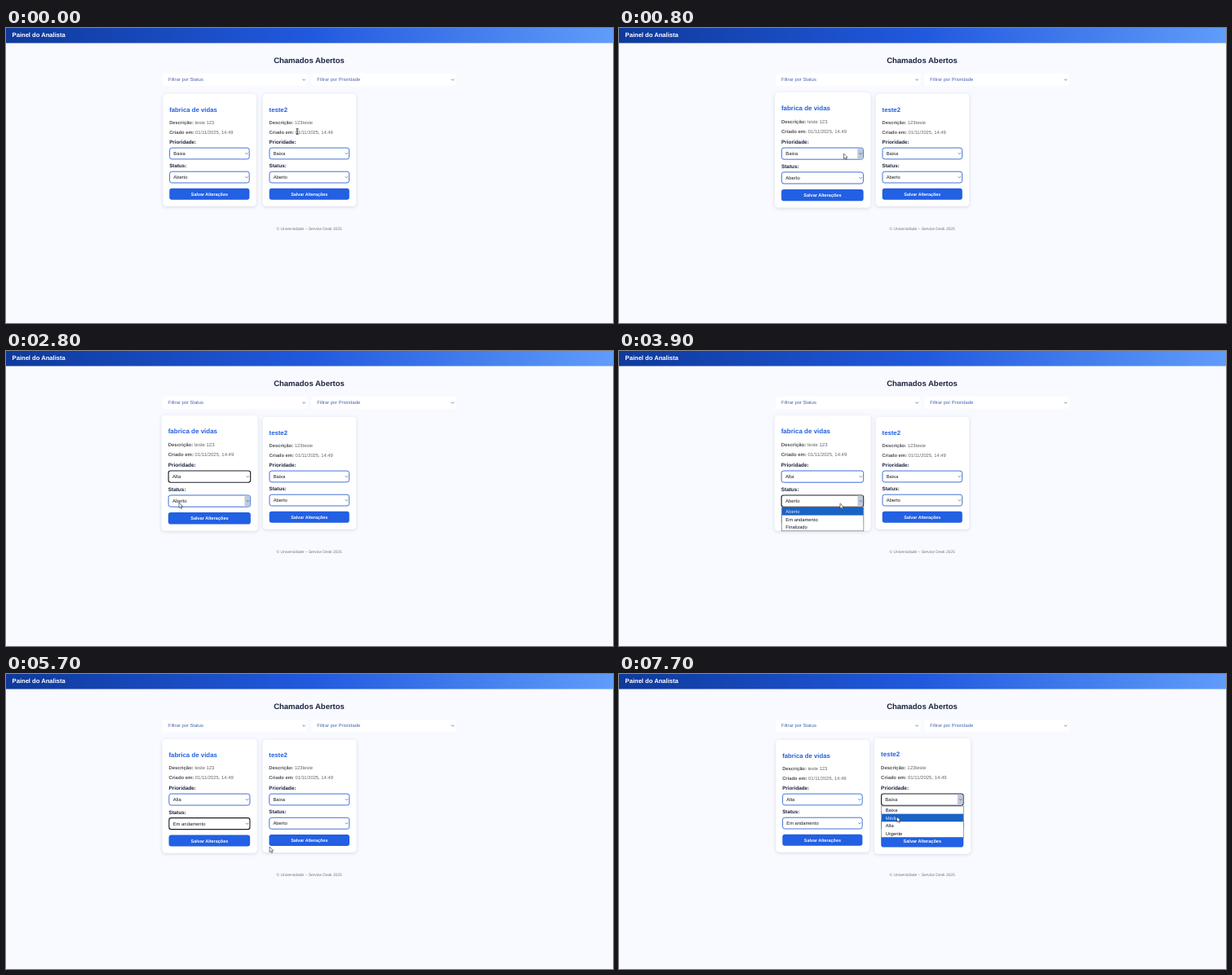
These frames come from a looping animation (744 px wide and 362 px high, 8 s). An HTML page:

```html
<!DOCTYPE html>
<html lang="pt-BR">
<head>
<meta charset="utf-8">
<title>Painel do Analista</title>
<style>
  html, body { margin: 0; width: 100%; height: 100%; overflow: hidden; background: #f8faff; }
  svg { display: block; width: 744px; height: 362px; font: 5.8px "Liberation Sans", Arial, sans-serif; text-rendering: geometricPrecision; }
  .bold { font-weight: 700; }
  .panel { fill: #fff; filter: drop-shadow(0 1.5px 2px rgba(30, 50, 100, .16)); }
  .name { font-size: 7.75px; font-weight: 700; fill: #2160df; }
  .label { font-size: 6.25px; font-weight: 700; fill: #1c2340; }
  .info { fill: #66666c; }
  .info .bold { fill: #505058; }
  .box { fill: #fff; stroke: #3a6cd4; stroke-width: .95; }
  .focus .box { stroke: #1c202a; stroke-width: 1.1; }
  .value { fill: #1c1e26; }
  .block { fill: #bfc9db; visibility: hidden; }
  .hover .block { visibility: visible; }
  .chevron { fill: none; stroke: #4a5878; stroke-width: .75; }
  .button { fill: #2260e4; }
  .action { font-size: 5.4px; font-weight: 700; fill: #fff; text-anchor: middle; }
  .field { fill: #fff; }
  .filter { fill: #4464b8; }
  .list { fill: #fff; stroke: #70747c; stroke-width: .7; }
  .mark { fill: #1b62c6; }
</style>
</head>
<body>
<svg id="stage" viewBox="0 0 744 362"></svg>
<script>
const LOOP = 8000, STEP = 100, ROW = 9.6;
const CENTER = { x: 249.5, y: 150 }, CARD_GAP = 122.4;
const BOX = { x: 200.6, y: 147.1, w: 97.6, h: 13.8 }, FIELD_GAP = 29.1;
const ZOOM = .03, ZOOM_TIME = 400;

const cards = [
  { name: 'fabrica de vidas', description: 'teste 123', enter: 500, leave: 5500 },
  { name: 'teste2', description: '123teste', enter: 5600, leave: LOOP }
];
const fields = [
  { label: 'Prioridade', options: ['Baixa', 'Média', 'Alta', 'Urgente'] },
  { label: 'Status', options: ['Aberto', 'Em andamento', 'Finalizado'] }
];
const picks = [
  { card: 0, field: 0, open: 1000, close: 2800, option: 2 },
  { card: 0, field: 1, open: 3900, close: 5100, option: 1 },
  { card: 1, field: 0, open: 7100, close: LOOP, option: 1 }
];
const start = { x: 357, y: 127 };
const moves = [
  { from: 0, until: 800, x: 275.5, y: 154 },
  { from: 1400, until: 1900, x: 212, y: 186 },
  { from: 3000, until: 3300, x: 271, y: 187 },
  { from: 4300, until: 4500, x: 250, y: 203 },
  { from: 5100, until: 5700, x: 323, y: 212 },
  { from: 5700, until: 6400, x: 359, y: 167 },
  { from: 6800, until: 7000, x: 360, y: 154 },
  { from: 7500, until: 7700, x: 340.5, y: 175 }
];

const stage = document.getElementById('stage');
const $ = id => document.getElementById(id);
const text = (x, y, cls, str) => `<text x="${x}" y="${y}" class="${cls}">${str}</text>`;
const rect = (x, y, w, h, r, cls) => `<rect x="${x}" y="${y}" width="${w}" height="${h}" rx="${r}" class="${cls}"/>`;
const chevron = (x, y) => `<path class="chevron" d="M${x - 1.6} ${y - .8}l1.6 1.6 1.6-1.6"/>`;

const info = (y, label, value) =>
  `<text x="200.2" y="${y}" class="info"><tspan class="bold">${label}:</tspan> ${value}</text>`;

function fieldMarkup({ label }, f, n) {
  const y = BOX.y + f * FIELD_GAP;
  return text(200.2, y - 4.8, 'label', label + ':') + `<g id="select${n}${f}">
    ${rect(BOX.x, y, BOX.w, BOX.h, 2.6, 'box')}
    ${rect(291.2, y + .6, 6.5, BOX.h - 1.2, 1, 'block')}
    ${text(205.3, y + 8.9, 'value', '')}
    ${chevron(295, y + 6.9)}
  </g>`;
}

const cardMarkup = ({ name, description }, n) => `<g transform="translate(${n * CARD_GAP})"><g id="card${n}">
  ${rect(192.3, 80.8, 114.6, 138, 4.5, 'panel')}
  ${text(200.2, 102.7, 'name', name)}
  ${info(117.5, 'Descrição', description)}
  ${info(129.5, 'Criado em', '01/11/2025, 14:49')}
  ${fields.map((field, f) => fieldMarkup(field, f, n)).join('')}
  ${rect(200.3, 196.7, 98.1, 14, 3, 'button')}
  ${text(249.4, 205.7, 'action', 'Salvar Alterações')}
</g></g>`;

const filterMarkup = ({ label }, i) => {
  const x = 192 + i * 182.3, w = 177.5;
  return rect(x, 56, w, 15, 3, 'field') + text(x + 7, 65.3, 'filter', 'Filtrar por ' + label) + chevron(x + w - 4.3, 63.5);
};

stage.innerHTML = `
  <defs><linearGradient id="bar">
    <stop stop-color="#0f3a9c"/><stop offset=".5" stop-color="#2159de"/><stop offset="1" stop-color="#609cfa"/>
  </linearGradient></defs>
  <rect width="744" height="18.5" fill="url(#bar)"/>
  <g fill="#fff" font-size="7.6">${text(7.6, 11.2, 'bold', 'Painel do Analista')}</g>
  <g fill="#1c2340" font-size="9.5" text-anchor="middle">${text(371.5, 43.2, 'bold', 'Chamados Abertos')}</g>
  ${[...fields].reverse().map(filterMarkup).join('')}
  ${cards.map(cardMarkup).join('')}
  <g fill="#76787e" font-size="4.92" text-anchor="middle">${text(371.7, 247.6, '', '© Universidade – Service Desk 2025')}</g>
  <g id="popup"></g>
  <g id="cursor">
    <path id="arrow" d="M0 0V6.6L1.5 5.2 2.6 7.6 3.7 7.1 2.6 4.8H4.7Z" fill="#fff" stroke="#22252c" stroke-width=".6"/>
    <path id="beam" d="M-1.5-3.2H1.5M0-3.2V3.2M-1.5 3.2H1.5" stroke="#22252c" stroke-width=".9"/>
  </g>`;

const clamp = (v, lo, hi) => Math.min(hi, Math.max(lo, v));
const ease = (t, from, until) => {
  const k = clamp((t - from) / (until - from), 0, 1);
  return k * k * (3 - 2 * k);
};

const pointerAt = t => moves.reduce((p, m) => {
  const k = ease(t, m.from, m.until);
  return { x: p.x + (m.x - p.x) * k, y: p.y + (m.y - p.y) * k };
}, start);

const zoomAt = ({ enter, leave }, t) =>
  1 + ZOOM * (ease(t, enter, enter + ZOOM_TIME) - ease(t, leave, leave + ZOOM_TIME));

// Stage rectangle of a select, with its card's zoom applied.
function boxOf(n, f, zoom) {
  return {
    x: CENTER.x + n * CARD_GAP + (BOX.x - CENTER.x) * zoom,
    y: CENTER.y + (BOX.y + f * FIELD_GAP - CENTER.y) * zoom,
    w: BOX.w * zoom,
    h: BOX.h * zoom
  };
}

const inside = (p, b) => p.x >= b.x && p.x <= b.x + b.w && p.y >= b.y && p.y <= b.y + b.h;

function popupMarkup(box, options, pointer) {
  const x = box.x + .2, y = box.y + box.h + .8;
  const active = clamp(Math.floor((pointer.y - y) / ROW), 0, options.length - 1);
  return rect(x, y, box.w, options.length * ROW, 0, 'list') +
    rect(x + .3, y + active * ROW, box.w - .6, ROW, 0, 'mark') +
    options.map((option, i) =>
      `<g fill="${i === active ? '#dce8ff' : '#15171f'}">${text(x + 5, y + i * ROW + 6.9, '', option)}</g>`).join('');
}

function draw(t) {
  const pointer = pointerAt(t);
  const focused = picks.findLast(p => t >= p.open);
  const opened = focused && t < focused.close ? focused : null;
  $('popup').innerHTML = '';

  cards.forEach((card, n) => {
    const zoom = zoomAt(card, t);
    $('card' + n).setAttribute('transform',
      `translate(${CENTER.x} ${CENTER.y}) scale(${zoom}) translate(${-CENTER.x} ${-CENTER.y})`);
    fields.forEach(({ options }, f) => {
      const el = $(`select${n}${f}`), box = boxOf(n, f, zoom);
      const own = p => p && p.card === n && p.field === f;
      const done = picks.find(p => own(p) && t >= p.close);
      el.querySelector('text').textContent = options[done ? done.option : 0];
      el.classList.toggle('focus', Boolean(own(focused)));
      el.classList.toggle('hover', Boolean(opened ? own(opened) : inside(pointer, box)));
      if (own(opened)) $('popup').innerHTML = popupMarkup(box, options, pointer);
    });
  });

  const overText = t < 200;
  $('cursor').setAttribute('transform', `translate(${pointer.x} ${pointer.y})`);
  $('beam').style.display = overText ? '' : 'none';
  $('arrow').style.display = overText ? 'none' : '';
}

let shown = -1;
function tick() {
  const t = Math.floor(performance.now() % LOOP / STEP) * STEP;
  if (t !== shown) draw(shown = t);
  requestAnimationFrame(tick);
}
tick();
</script>
</body>
</html>
```
